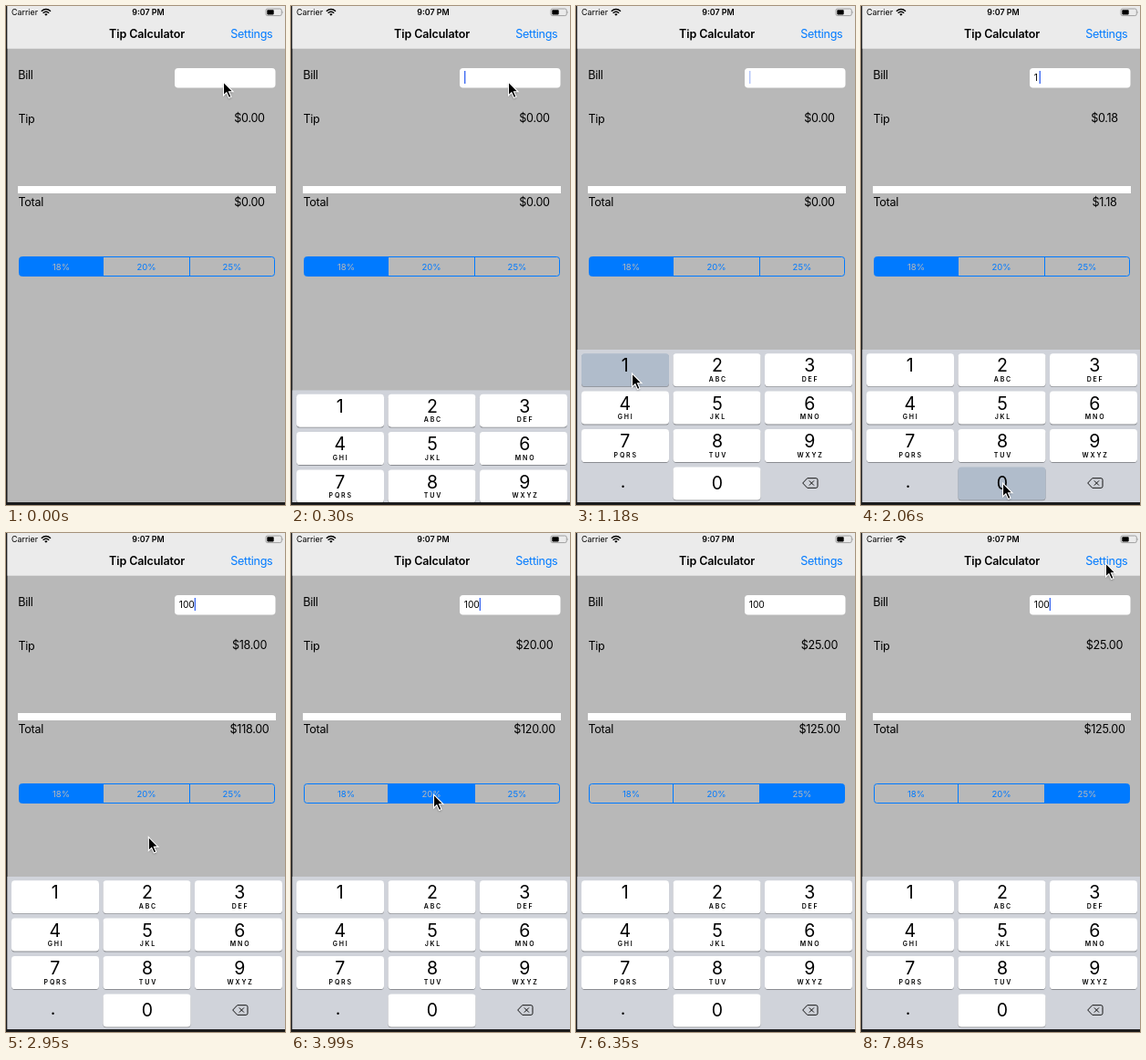
Animation, 306 px wide and 546 px high, one loop 8 s. Source, as an HTML page:

```html
<!DOCTYPE html>
<html lang="en">
<head>
<meta charset="utf-8">
<title>Tip Calculator</title>
<style>
  html, body { margin: 0; width: 100%; height: 100%; overflow: hidden; background: #1b1b1c; }
  svg { display: block; width: 306px; height: 546px; font-family: Inter, Roboto, sans-serif; }
  .body { font-size: 12.6px; letter-spacing: -.3px; }
  .mid { text-anchor: middle; }
  .title { font-size: 12.5px; font-weight: 600; letter-spacing: -.1px; }
  .status { font-size: 8.9px; }
  .seg { font-size: 9.5px; text-anchor: middle; }
  .digit { font-size: 19.5px; text-anchor: middle; }
  .abc { font-size: 7px; font-weight: 600; letter-spacing: 1.8px; text-anchor: middle; }
</style>
</head>
<body>
<svg viewBox="0 0 306 546">
  <defs>
    <clipPath id="screen"><rect x="1.5" width="304.5" height="543"/></clipPath>
    <clipPath id="pill"><rect x="14.5" y="274.5" width="280" height="21" rx="3"/></clipPath>
    <filter id="soft" x="-50%" y="-50%" width="200%" height="200%"><feGaussianBlur stdDeviation="1"/></filter>
    <path id="arrow" d="M0 0V15L3.4 11.8L6 17.5L8.5 16.4L6 10.8H10.6Z"/>
  </defs>
  <rect width="306" height="546" fill="#1b1b1c"/>
  <g clip-path="url(#screen)">
    <rect width="306" height="543" fill="#b8b8b8"/>
    <rect width="306" height="46.7" fill="#ebebeb"/>
    <text class="status" x="6" y="10.3">Carrier</text>
    <g fill="none" stroke="#000" stroke-width="1.5">
      <path d="M38.8 5.7Q43.9 1.2 49 5.7M40.6 7.7Q43.9 4.9 47.2 7.7"/>
      <path d="M42.2 9L43.9 10.8L45.6 9Q43.9 7.7 42.2 9Z" fill="#000" stroke="none"/>
    </g>
    <text class="status mid" x="156" y="10.3" font-weight="600">9:07 PM</text>
    <rect x="285" y="3" width="17.3" height="7.6" rx="1.9" fill="none" stroke="#8c8c8c" stroke-width=".8"/>
    <rect x="286.3" y="4.2" width="7.4" height="5.2" rx=".8"/>
    <path d="M303.3 5.4q1.3 1.4 0 2.8z" fill="#8c8c8c"/>
    <text class="title mid" x="154.6" y="35.2">Tip Calculator</text>
    <text class="body" x="246.3" y="35.2" fill="#007aff">Settings</text>

    <text class="body" x="13.3" y="80.3">Bill</text>
    <text class="body" x="13.5" y="128">Tip</text>
    <text class="body" x="13.5" y="218.7">Total</text>
    <rect x="185" y="68" width="110.5" height="21.5" rx="3.8" fill="#fff"/>
    <text id="bill" x="189.8" y="82" font-size="10.3" letter-spacing="-.1"></text>
    <rect id="caret" y="71" width="1.4" height="14" fill="#3f6bf2"/>
    <text id="tip" class="body mid" x="267" y="127.4"></text>
    <text id="total" class="body mid" x="267" y="218.7"></text>
    <rect x="13" y="197" width="283" height="8" fill="#fff"/>
    <g id="segments" clip-path="url(#pill)"></g>
    <rect x="14.5" y="274.5" width="280" height="21" rx="3" fill="none" stroke="#007aff"/>
    <path d="M106.5 275V295M201.5 275V295" stroke="#007aff"/>
    <g id="keyboard"><rect y="376" width="306" height="167" fill="#d0d3da"/></g>
  </g>
  <g id="cursor">
    <use href="#arrow" y="1.2" opacity=".4" filter="url(#soft)"/>
    <use href="#arrow" fill="#000" stroke="#fff" stroke-width="1.1"/>
  </g>
</svg>
<script>
const LOOP = 8000, STEP = 147.9; // the picture is refreshed once per step
const BLUE = '#007aff', GRAY = '#b8b8b8';
const RATES = [18, 20, 25];
const $ = id => document.getElementById(id);

function add(parent, tag, attrs, text) {
  const el = document.createElementNS('http://www.w3.org/2000/svg', tag);
  for (const name in attrs) el.setAttribute(name, attrs[name]);
  if (text) el.textContent = text;
  return parent.appendChild(el);
}

// Segmented control
const EDGES = [14.5, 106.5, 201.5, 294.5];
const segs = RATES.map((rate, i) => {
  const x = EDGES[i], width = EDGES[i + 1] - x;
  return {
    box: add($('segments'), 'rect', { x, y: 274.5, width, height: 21 }),
    label: add($('segments'), 'text', { class: 'seg', x: x + width / 2, y: 288.8 }, rate + '%')
  };
});

// Number pad
const pad = $('keyboard'), keys = {};
function addKey(digit, col, row, letters) {
  const x = 6 + col * 100.5, y = 380.2 + row * 41.4, mid = 53.8 + col * 101.2;
  const box = { x, y, width: 96, height: 36, rx: 3.6 };
  add(pad, 'rect', { ...box, y: y + .9, fill: '#8b8d92' });
  keys[digit] = add(pad, 'rect', box);
  add(pad, 'text', { class: 'digit', x: mid, y: y + (row === 3 ? 25 : 20.2) }, String(digit));
  if (letters) add(pad, 'text', { class: 'abc', x: mid + .9, y: y + 30.6 }, letters);
}
['', 'ABC', 'DEF', 'GHI', 'JKL', 'MNO', 'PQRS', 'TUV', 'WXYZ']
  .forEach((letters, i) => addKey(i + 1, i % 3, Math.floor(i / 3), letters));
addKey(0, 1, 3);
add(pad, 'text', { class: 'digit', x: 51.5, y: 527 }, '.');
add(pad, 'path', {
  d: 'M248.7 522L253.7 516.7H263.2Q265 516.7 265 518.5V525.5Q265 527.3 263.2 527.3H253.7ZM255.8 519.4l5.2 5.2m0 -5.2l-5.2 5.2',
  fill: 'none', stroke: '#111', 'stroke-linejoin': 'round'
});

// Where the cursor rests, in steps
const STOPS = [
  { from: 0, to: 2, x: 238.5, y: 83 },    // bill field
  { from: 6, to: 9, x: 61.5, y: 402 },    // key 1
  { from: 13, to: 18, x: 155.5, y: 522 }, // key 0
  { from: 24, to: 28, x: 156.5, y: 286 }, // 20%
  { from: 31, to: 33, x: 240, y: 286 },   // 25%
  { from: 35, to: 35, x: 222.7, y: 262 },
  { from: 40, to: 40, x: 150, y: 432 },
  { from: 43, to: 48, x: 120, y: 560 },   // below the stage
  { from: 49, to: 49, x: 262, y: 80 },
  { from: 53, to: 55, x: 268.5, y: 33 }   // settings
];

// Taps: what is touched, when it goes down and up
const KEY_TAPS = [{ id: 1, down: 8, up: 9 }, { id: 0, down: 14, up: 15 }, { id: 0, down: 17, up: 18 }];
const SEG_TAPS = [{ id: 1, down: 25, up: 26 }, { id: 2, down: 32, up: 33 }];
const held = (taps, n) => taps.find(t => t.down <= n && n < t.up)?.id;
const done = (taps, n) => taps.filter(t => t.up <= n).map(t => t.id);

const clamp = v => Math.min(1, Math.max(0, v));
const easeOut = (n, a, b) => 1 - (1 - clamp((n - a) / (b - a))) ** 4;

function cursorAt(n) {
  const i = STOPS.findLastIndex(s => s.from <= n);
  const a = STOPS[i], b = STOPS[i + 1] || a;
  const k = n > a.to ? easeOut(n, a.to, b.from) : 0;
  return [a.x + (b.x - a.x) * k, a.y + (b.y - a.y) * k];
}

// Solid while typing, otherwise blinking with a short fade-in
function caretOpacity(n) {
  const period = 6.85, typing = n >= KEY_TAPS[0].up && n < KEY_TAPS[2].up;
  const origin = n < KEY_TAPS[0].up ? 1.2 : 45;
  const phase = ((n - origin) % period + period) % period;
  return typing || phase < 3 ? 1 : clamp((phase - 6.6) * 2);
}

function draw(t) {
  const n = Math.floor((t + 10) / STEP);
  const bill = done(KEY_TAPS, n).join('');
  const chosen = done(SEG_TAPS, n).pop() ?? 0;
  const touched = held(SEG_TAPS, n), pressed = held(KEY_TAPS, n);

  const tip = bill * RATES[chosen] / 100;
  $('bill').textContent = bill;
  $('tip').textContent = '$' + tip.toFixed(2);
  $('total').textContent = '$' + (+bill + tip).toFixed(2);
  $('caret').setAttribute('x', 190 + 5.55 * bill.length);
  $('caret').setAttribute('opacity', caretOpacity(n));

  segs.forEach(({ box, label }, i) => {
    box.setAttribute('fill', i === chosen ? BLUE : i === touched ? '#94aac6' : GRAY);
    label.setAttribute('fill', i === chosen ? GRAY : BLUE);
  });
  for (const digit in keys) keys[digit].setAttribute('fill', +digit === pressed ? '#b0bccb' : '#fff');

  pad.setAttribute('transform', `translate(0 ${167 * (1 - easeOut(n, 1, 4.55))})`);
  $('cursor').setAttribute('transform', `translate(${cursorAt(n)})`);
}

const start = performance.now();
function tick() {
  draw((performance.now() - start) % LOOP);
  requestAnimationFrame(tick);
}
tick();
</script>
</body>
</html>
```
